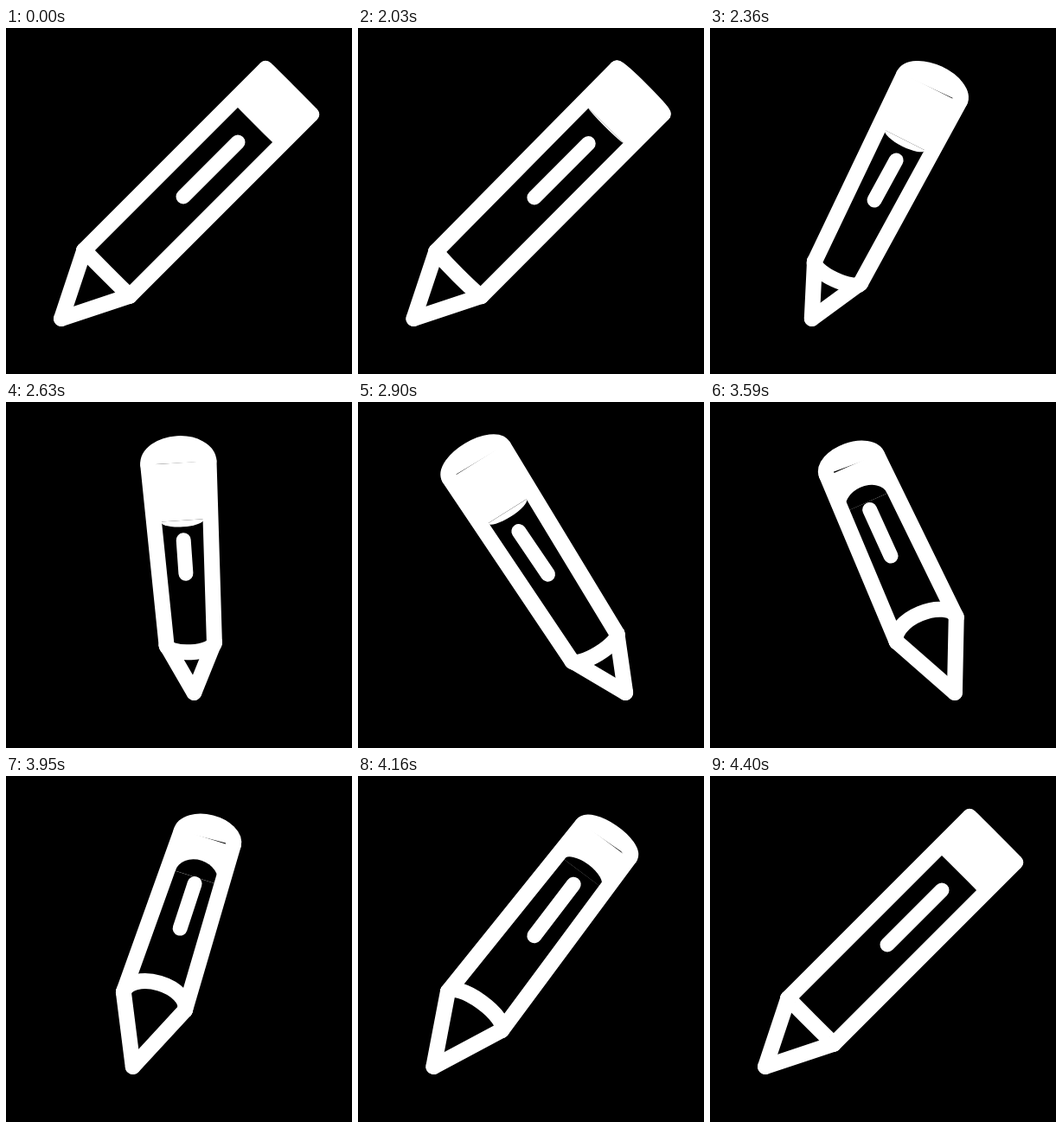
Write an HTML page without scripts that moves like this. It is 400x400 px and loops after 4430 ms.

```html
<!DOCTYPE html>
<html lang="en">
<head>
<meta charset="utf-8">
<title>Turning pencil</title>
<style>
@property --turn { syntax: "<angle>"; inherits: true; initial-value: 0deg; }

html, body { margin: 0; width: 100%; height: 100%; overflow: hidden; background: #000; }

svg {
  display: block; width: 100vw; height: 100vh;
  fill: none; stroke: #fff; stroke-width: 18;
  stroke-linecap: round; stroke-linejoin: round;
  animation: turn 4430ms linear infinite;

  --c: cos(var(--turn));
  --s: sin(var(--turn));
  --q: calc(var(--s) * var(--s));

  /* points on the axis: tip, base of the cone, mouth of the cap, end of the cap */
  --tip-x: calc(205 - var(--c) * (141 + 12 * var(--q)));
  --base-x: calc(205 - var(--c) * (88.25 + 6.4 * var(--q) + 6.9 * var(--s)));
  --base-y: calc(283.25 - 15 * var(--q) + 11 * var(--s));
  --mouth-x: calc(205 + var(--c) * (83 - 62 * var(--q) - 9 * var(--s)));
  --mouth-y: calc(112 + 16 * var(--q) + 9 * var(--s));
  --end-x: calc(205 + var(--c) * (121.5 - 55 * var(--q) + 3 * var(--s)));
  --end-y: calc(73.5 - 3 * var(--q) - 7 * var(--s) * var(--c) * var(--c));

  /* half widths across the axis */
  --base-w: calc(26.4 + 5.8 * var(--q) - 4.5 * var(--s));
  --base-h: calc(var(--c) * (26.4 - 2.9 * var(--q) - 3.8 * var(--s)));
  --mouth-w: calc(20 + 5 * var(--q));
  --mouth-h: calc(var(--c) * 20);
  --end-w: calc(26.4 + 6.7 * var(--q) + 2.1 * var(--s));
  --end-h: calc(var(--c) * (26.4 - 4.2 * var(--q) + 2.8 * var(--s)));
}

path { vector-effect: non-scaling-stroke; }

/* unit line from x1,y1 to x2,y2 */
.line {
  transform: matrix(
    calc(var(--x2) - var(--x1)), calc(var(--y2) - var(--y1)),
    calc(var(--y1) - var(--y2)), calc(var(--x2) - var(--x1)),
    var(--x1), var(--y1));
}
/* unit half circle across the axis, bulging by a share of its width */
.arc {
  transform: matrix(
    var(--w), var(--h),
    calc(var(--h) * var(--bulge) * -1), calc(var(--w) * var(--bulge)),
    var(--x), var(--y));
}

.left { --x1: calc(var(--base-x) - var(--base-w)); --y1: calc(var(--base-y) - var(--base-h)); }
.right { --x1: calc(var(--base-x) + var(--base-w)); --y1: calc(var(--base-y) + var(--base-h)); }
.left.side { --x2: calc(var(--end-x) - var(--end-w)); --y2: calc(var(--end-y) - var(--end-h)); }
.right.side { --x2: calc(var(--end-x) + var(--end-w)); --y2: calc(var(--end-y) + var(--end-h)); }
.cone { --x2: var(--tip-x); --y2: 336; }

.base {
  --x: var(--base-x); --y: var(--base-y); --w: var(--base-w); --h: var(--base-h);
  --bulge: calc((.3 + 16.5 * var(--s) - 5 * var(--q)) / 33);
}
.end {
  --x: var(--end-x); --y: var(--end-y); --w: var(--end-w); --h: var(--end-h);
  --bulge: calc((.3 + 22 * max(var(--s), 0 - var(--s))) / 35);
  fill: #fff;
}
.mouth {
  --x: var(--mouth-x); --y: var(--mouth-y); --w: var(--mouth-w); --h: var(--mouth-h);
  --bulge: calc((.3 + 15 * var(--s) - 7.8 * var(--q)) / 25);
  stroke: none;
  animation: mouth 4430ms step-end infinite;
}
.cap {
  fill: #fff; stroke: none;
  transform: matrix(
    calc(1.15 * var(--mouth-w)), calc(1.15 * var(--mouth-h)),
    calc(var(--end-x) - var(--mouth-x)), calc(var(--end-y) - var(--mouth-y)),
    var(--mouth-x), var(--mouth-y));
}
.shine {
  stroke-width: 17;
  --x1: calc(205 - var(--c) * (24.4 * var(--q) + 11.8 * var(--s)));
  --y1: calc(195 - 9 * var(--q) + 12.2 * var(--s));
  --x2: calc(205 + var(--c) * (63 - 50.7 * var(--q) - 15.3 * var(--s)));
  --y2: calc(132 + 10.3 * var(--q) + 17.6 * var(--s));
}

@keyframes turn {
  0%, 45.147% { --turn: 0deg; }
  99.323%, 100% { --turn: 360deg; }
}
/* the cap hides its mouth on the way out and shows it on the way back */
@keyframes mouth {
  0% { fill: #fff; }
  72.235%, 100% { fill: #000; }
}
</style>
</head>
<body>
<svg viewBox="0 0 400 400">
  <path class="cap" d="M-1 0H1V1H-1Z"/>
  <path class="arc end" d="M-1 0A1 1 0 0 1 1 0"/>
  <path class="arc mouth" d="M-1 0A1 1 0 0 0 1 0Z"/>
  <path class="line left side" d="M0 0H1"/>
  <path class="line right side" d="M0 0H1"/>
  <path class="line left cone" d="M0 0H1"/>
  <path class="line right cone" d="M0 0H1"/>
  <path class="arc base" d="M-1 0A1 1 0 0 0 1 0"/>
  <path class="line shine" d="M0 0H1"/>
</svg>
</body>
</html>
```
